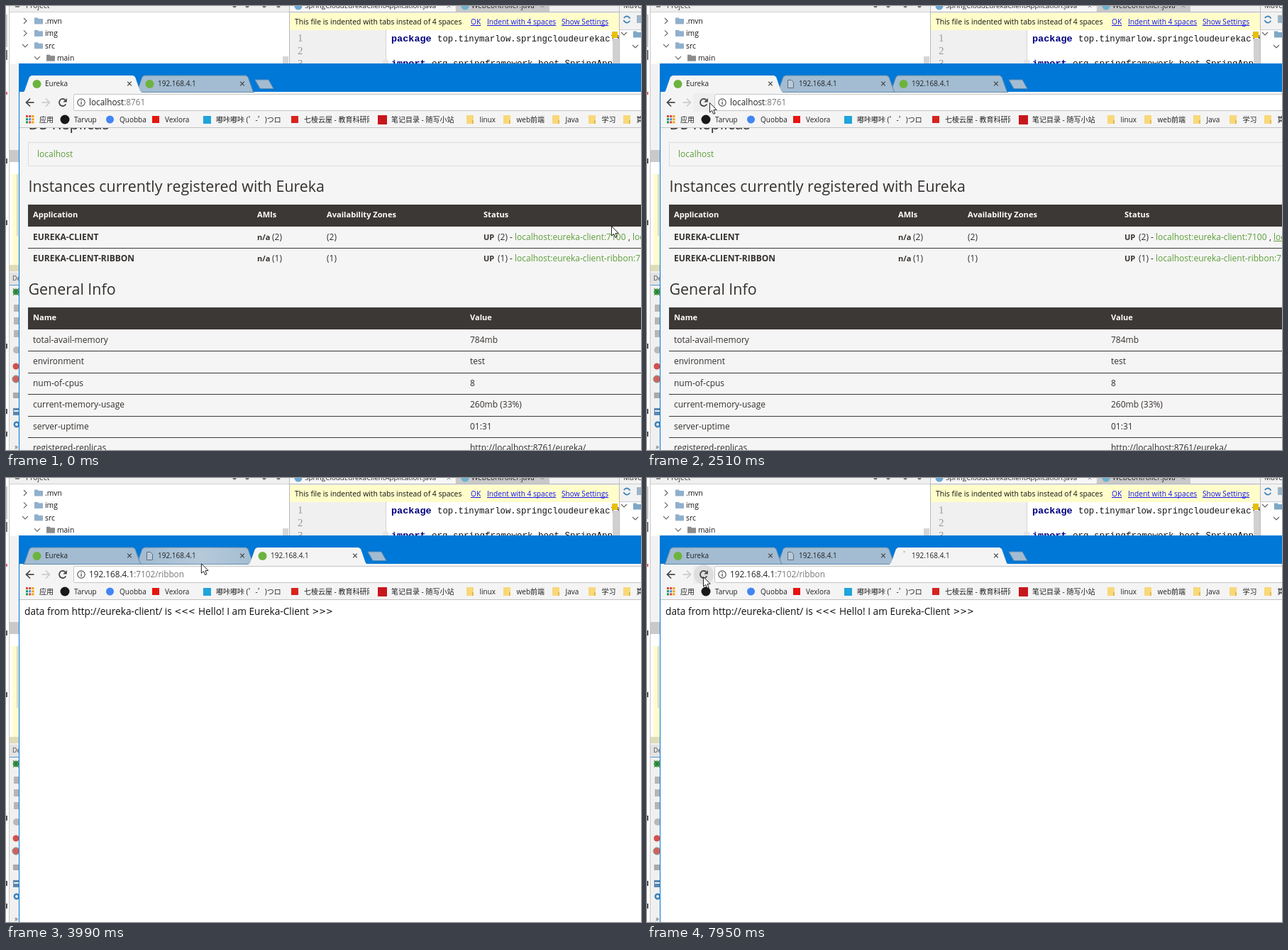
Write an HTML page with a canvas that moves like this. It is 895x626 px and loops after 8 s.

```html
<!DOCTYPE html>
<html lang="en">
<head>
<meta charset="utf-8">
<title>Service registry</title>
<style>
html, body { margin: 0; width: 100%; height: 100%; overflow: hidden; background: #fff; }
canvas { display: block; }
</style>
</head>
<body>
<canvas id="stage" width="895" height="626"></canvas>
<script>
const c = document.getElementById('stage').getContext('2d');
const SANS = '"Open Sans","Noto Sans CJK SC","Noto Sans CJK",sans-serif';
const WIDE = '"DejaVu Sans",sans-serif';
const MONO = '"Liberation Mono",monospace';
const LOOP = 8000, PITCH = 159, GREEN = '#5f9e3c', DARK = '#3c3836', PAGE = '#f5f5f5';
const TAB = '#a3bcd1', TAB_EDGE = '#5f8bb0';

// Screen updates arrive in bursts: start, end, number of steps.
const bursts = [[150, 300, 2], [700, 1660, 8], [1810, 2780, 8], [3020, 3990, 8], [4110, 5070, 8],
  [5190, 5730, 5], [6010, 6280, 3], [6560, 6860, 3], [7290, 7410, 2], [7800, 7950, 2]];
// Pointer path: time, x, y.
const path = [[0, 853, 310], [150, 864, 320], [300, 889, 322], [840, 885, 320], [1250, 440, 180],
  [1520, 150, 114], [1660, 119, 109], [1950, 119, 109], [2500, 88, 136], [2780, 79, 139],
  [3020, 84, 137], [3430, 385, 106], [3690, 387, 106], [4110, 230, 126], [4530, 79, 139]];
const presses = [[2640, 2780], [5190, 5450], [6010, 6270], [6700, 6850], [7290, 7400], [7800, 8000]];
const reloads = [[5320, 5590], [6140, 6270], [6700, 6850], [7290, 7400], [7940, 8000]];

const clamp = v => Math.max(0, Math.min(1, v));
const within = (t, list) => list.find(([a, b]) => t >= a && t < b);

function snap(t) {
  let last = 0;
  for (const [a, b, n] of bursts)
    for (let k = 0; k < n; k++) {
      const step = a + k * (b - a) / (n - 1);
      if (step <= t + .5) last = step;
    }
  return last;
}
function pointerAt(t) {
  const i = path.findIndex(p => p[0] > t);
  if (i < 0) return path[path.length - 1].slice(1);
  const [t0, x0, y0] = path[i - 1], [t1, x1, y1] = path[i], f = (t - t0) / (t1 - t0);
  return [x0 + (x1 - x0) * f, y0 + (y1 - y0) * f];
}

function rect(x, y, w, h, color) { c.fillStyle = color; c.fillRect(x, y, w, h); }
function text(s, x, y, size = 10, color = '#222', weight = 'normal', family = SANS) {
  c.font = `${weight} ${size}px ${family}`;
  c.fillStyle = color;
  c.fillText(s, x, y);
}
function line(points, color, width = 1) {
  c.beginPath();
  points.forEach(([x, y]) => c.lineTo(x, y));
  c.strokeStyle = color; c.lineWidth = width; c.stroke();
}
function poly(points, fill, stroke) {
  c.beginPath();
  points.forEach(([x, y]) => c.lineTo(x, y));
  c.closePath();
  c.fillStyle = fill; c.fill();
  if (stroke) { c.strokeStyle = stroke; c.lineWidth = 1; c.stroke(); }
}
function disc(x, y, r, color) { c.beginPath(); c.arc(x, y, r, 0, 7); c.fillStyle = color; c.fill(); }
function arc(x, y, r, from, to, color, width) {
  c.beginPath(); c.arc(x, y, r, from, to);
  c.strokeStyle = color; c.lineWidth = width; c.stroke();
}
function cross(x, y, r, color, width) {
  line([[x - r, y - r], [x + r, y + r]], color, width);
  line([[x + r, y - r], [x - r, y + r]], color, width);
}
function chevron(x, y, open) {
  line(open ? [[x - 4, y - 2], [x, y + 2], [x + 4, y - 2]] : [[x - 2, y - 4], [x + 2, y], [x - 2, y + 4]], '#666', 1.2);
}
function folder(x, y, color, w = 12, h = 9) {
  rect(x, y - h / 2, w * .45, 3, color);
  rect(x, y - h / 2 + 1.5, w, h - 1.5, color);
}

function editor() {
  rect(0, 0, 895, 626, '#f0f0f0');
  rect(0, 0, 4, 626, '#fff');
  rect(4, 0, 1, 626, '#c4c4c4');
  rect(0, 62, 2, 14, '#777');
  rect(0, 121, 2, 4, '#e06060');
  rect(0, 12, 2, 46, '#c8c8c8');
  for (const y of [215, 302, 476, 568, 600]) rect(0, y, 2, 7, '#555');
  rect(5, 8, 394, 74, '#fff');
  rect(5, 8, 394, 1, '#d0d0d0');
  rect(13, 0, 6, 2, '#888');
  text('Project', 28, 3, 10.3, '#333');
  for (const x of [322, 340, 364, 384]) disc(x, 0, 2.5, '#777');
  [['.mvn', 0, 0], ['img', 0, 0], ['src', 0, 1], ['main', 1, 1]].forEach(([name, depth, open], i) => {
    const x = 27 + depth * 17, y = 21 + i * 17.4;
    chevron(x, y, open);
    folder(x + 13, y, depth ? '#8c8c8c' : '#8fb0cc');
    text(name, x + 28, y + 4, 10.3, '#111');
  });
  rect(390, 71, 8, 11, '#d6d6d6');

  rect(5, 82, 13, 121, '#f2f2f2');
  rect(5, 203, 13, 17, '#c9c9c9');
  rect(5, 220, 13, 145, '#fff');
  rect(9, 237, 9, 128, '#fffbcf');
  rect(15, 237, 2, 87, '#d2d8cc');
  rect(5, 365, 13, 9, '#dedbb8');
  rect(5, 376, 13, 16, '#e2e2e2');
  text('De', 9, 387, 9, '#444');
  rect(5, 393, 13, 1, '#4a8fc7');
  disc(14, 403, 4.5, '#3f9a45');
  line([[10, 398], [18, 408]], '#27682d');
  line([[10, 408], [18, 398]], '#27682d');
  for (const y of [426, 444, 462]) rect(11, y - 5, 7, 10, '#b5b5b5');
  disc(15, 485, 5, '#b8b8b8');
  disc(14, 508, 4.5, '#d2504a');
  disc(14, 526, 4.5, '#cf6159');
  arc(14, 526, 5, 0, 7, '#777', 1);
  rect(10, 545, 8, 8, '#aaa');
  rect(10, 567, 8, 10, '#5b87ad');
  rect(11, 570, 7, 2, '#eee');
  arc(15, 590, 3.2, 0, 7, '#3e82b8', 2.5);
  text('»', 12, 625, 10, '#555');

  rect(399, 0, 1, 82, '#b8b8b8');
  rect(400, 0, 233, 8, '#f7f7f7');
  rect(634, 0, 132, 8, '#c9c9c9');
  rect(400, 8, 464, 1, '#b8b8b8');
  disc(412, 0, 5.5, '#6ca6d2');
  disc(647, 0, 5.5, '#6ab3cf');
  text('SpringCloudEurekaClientApplication.java', 421, 3, 9.8, '#222');
  text('WebController.java', 656, 3, 10, '#222');
  cross(624, 0, 2.5, '#888');
  cross(756, 0, 2.5, '#888');
  rect(400, 10, 464, 24, '#fffdc9');
  text('This file is indented with tabs instead of 4 spaces', 407, 26, 10.4, '#111');
  [['OK', 655], ['Indent with 4 spaces', 678], ['Show Settings', 783]].forEach(([s, x]) => {
    text(s, x, 26, 10.2, '#1414f0');
    rect(x, 27, c.measureText(s).width, 1, '#1414f0');
  });
  rect(536, 34, 328, 48, '#fff');
  rect(535, 34, 1, 48, '#d4d4d4');
  [50, 68, 86].forEach((y, i) => text(i + 1, 411, y, 15, '#999', 'normal', '"Liberation Serif",serif'));
  text('package', 543, 50, 13.5, '#000080', 'bold', MONO);
  text('top.tinymarlow.springcloudeurekaclient', 608, 50, 12.3, '#111', 'normal', MONO);
  text('import', 543, 85, 13.5, '#000080', 'bold', MONO);
  text('org.springframework.boot.SpringApplication', 600, 85, 12.5, '#111', 'normal', MONO);
  rect(531, 76, 8, 8, '#e4e4e4');
  rect(855, 46, 9, 36, '#d0d0d0');
  rect(854, 36, 8, 9, '#e8c000');

  rect(864, 0, 31, 82, '#f2f2f2');
  rect(864, 0, 1, 82, '#bdbdbd');
  text('Maven', 870, 3, 10.3, '#333');
  rect(865, 8, 30, 1, '#ccc');
  arc(875, 19, 4.5, .4, 2.9, '#3b82b5', 1.8);
  arc(875, 19, 4.5, 3.6, 6, '#3b82b5', 1.8);
  rect(889, 13, 6, 11, '#9db5c8');
  rect(865, 33, 30, 49, '#fff');
  rect(865, 33, 30, 1, '#ccc');
  chevron(871, 39, true);
  chevron(887, 57, true);
  folder(884, 40, '#7fa8c6');
}

function tab(x, { title, icon }, active, mouse, now) {
  const shape = [[x, 121.5], [x + 2, 120], [x + 9, 100], [x + 12, 98], [x + 155, 98],
    [x + 158, 100], [x + 165, 120], [x + 167, 121.5]];
  poly(shape, active ? '#f4f4f4' : TAB, active ? null : TAB_EDGE);
  if (!active && mouse[1] < 121 && mouse[0] > x + 5 && mouse[0] < x + 163) {
    const glow = c.createRadialGradient(mouse[0], 110, 0, mouse[0], 110, 80);
    glow.addColorStop(0, 'rgba(255,255,255,.2)');
    glow.addColorStop(1, 'rgba(255,255,255,0)');
    poly(shape, glow);
  }
  if (active) rect(x, 121, 167, 2, '#f4f4f4');
  if (icon === 'leaf') disc(x + 19.5, 110, 6, '#6db33f');
  if (icon === 'page') poly([[x + 15.5, 104.5], [x + 20.5, 104.5], [x + 23.5, 107.5], [x + 23.5, 115.5], [x + 15.5, 115.5]], '#b9cad9', '#5c7080');
  if (icon === 'wait') arc(x + 19, 109.5, 5.5, .2 + (now - 1660) / 160, 2.8 + (now - 1660) / 160, '#999', 1.3);
  if (icon === 'begin') arc(x + 20, 109.5, 5.5, -1.65, -1.3, '#999', 1.3);
  text(title, x + 31, 113, 10, '#222');
  cross(x + 150, 109.5, 2.8, '#444', 1.2);
}

function tabStrip(now, view, mouse) {
  rect(18, 81, 877, 545, '#0078d7');
  const opened = 1 - (1 - clamp((now - 650) / 240)) ** 2;
  const reload = within(now, reloads);
  const loading = now < 2050;
  const address = '192.168.4.1';
  const tabs = [[24, { title: 'Eureka', icon: 'leaf' }, view === 'eureka']];
  if (now >= 700) tabs.push([183, { title: loading ? '正在加载...' : address, icon: loading ? 'wait' : 'page' }, view === 'blank']);
  tabs.push([183 + PITCH * (now >= 700 ? opened : 0),
    { title: address, icon: !reload ? 'leaf' : now - reload[0] < 100 ? 'begin' : 'wait' }, view === 'ribbon']);
  const end = tabs[tabs.length - 1][0] + 168;
  poly([[end, 104], [end + 19, 104], [end + 26, 116.5], [end + 7, 116.5]], TAB, TAB_EDGE);
  tabs.sort((a, b) => a[2] - b[2] || b[0] - a[0]);
  rect(19, 121, 876, 51, '#f4f4f4');
  for (const [x, info, active] of tabs) tab(x, info, active, mouse, now);
}

function toolbar(now, view, mouse) {
  const blank = view === 'blank', ink = '#444', faint = '#ccc';
  const arrow = (x, dir, color) => {
    line([[x - 5.5 * dir, 136], [x + 5 * dir, 136]], color, 1.7);
    line([[x, 130.5], [x + 5.5 * dir, 136], [x, 141.5]], color, 1.7);
  };
  arrow(34, -1, blank ? faint : ink);
  arrow(56, 1, faint);
  const over = Math.abs(mouse[0] - 80) < 14 && Math.abs(mouse[1] - 136) < 14;
  if (over) rect(65, 123, 29, 26, '#eeeeee');
  if (within(now, presses)) disc(80, 136, 14, '#dedede');
  if (blank) cross(80, 136, 4.5, ink, 1.8);
  else {
    arc(80, 136, 5, .5, 5.4, ink, 1.8);
    poly([[85.8, 130], [85.8, 135.5], [80.3, 135.5]], ink);
  }
  c.beginPath();
  c.roundRect(95.5, 124.5, 820, 23, 2);
  c.fillStyle = '#fff'; c.fill();
  c.strokeStyle = '#c4c4c4'; c.lineWidth = 1; c.stroke();
  arc(106, 136, 5.2, 0, 7, '#555', 1.2);
  rect(105.4, 135, 1.3, 4, '#555');
  rect(105.4, 132.7, 1.3, 1.4, '#555');
  const [host, rest] = { eureka: ['localhost', ':8761'], blank: ['192.168.4.1', ':7101/info'], ribbon: ['192.168.4.1', ':7102/ribbon'] }[view];
  text(host, 117, 140, 11.75, '#222');
  text(rest, 117 + c.measureText(host).width, 140, 11.75, '#777');

  const hues = ['#db4437', '#db4437', '#f4a100', '#0f9d58', '#4285f4', '#f4a100', '#0f9d58', '#db4437', '#f4a100'];
  hues.forEach((hue, i) => rect(28 + i % 3 * 4.2, 154 + Math.floor(i / 3) * 4.2, 3, 3, hue));
  text('应用', 47, 164);
  disc(83, 160, 6.5, '#1b1817');
  text('Tarvup', 96, 164);
  disc(146.5, 160, 5.5, '#4285f4');
  text('Quobba', 160, 164);
  rect(206, 155, 10, 10, '#e6150f');
  text('Vexlora', 224, 164);
  rect(278, 155, 11, 11, '#20a4dc');
  text('嘟咔嘟咔 (゜-゜)つロ', 296, 164);
  rect(402, 155, 10, 10, '#d8231f');
  c.save();
  c.beginPath(); c.rect(420, 150, 92, 20); c.clip();
  text('七棱云屋 - 教育科研网', 420, 164);
  c.restore();
  rect(524, 154, 13, 13, '#c8161d');
  text('笔记目录 - 随写小站', 543, 164);
  [['linux', 649], ['web前端', 701], ['Java', 770], ['学习', 821], ['算法', 870]].forEach(([s, x]) => {
    rect(x, 154, 10, 12, '#f8d878');
    rect(x + 8, 161, 2, 5, '#e0b850');
    text(s, x + 18.5, 164);
  });
  rect(19, 171, 876, 1, '#c2c2c2');
}

function registryPage(now) {
  rect(19, 172, 876, 454, PAGE);
  c.save();
  c.beginPath(); c.rect(19, 172, 876, 454); c.clip();
  const body = (s, x, y, color = '#34302d') => text(s, x, y, 12, color);
  const bold = (s, x, y, size = 12, color = '#34302d') => text(s, x, y, size, color, 'bold');
  const heading = (s, y) => text(s, 31.5, y, 21.4, '#34302d');
  const header = (y, cells) => {
    rect(31, y, 864, 31, DARK);
    cells.forEach(([s, x]) => bold(s, x, y + 18, 11.1, '#fff'));
  };
  heading('DS Replicas', 174);
  c.strokeStyle = '#dcdcdc'; c.lineWidth = 1; c.strokeRect(31.5, 192.5, 880, 33);
  body('localhost', 44, 213, GREEN);
  heading('Instances currently registered with Eureka', 262);
  header(280, [['Application', 38], ['AMIs', 354], ['Availability Zones', 452], ['Status', 673]]);
  [['EUREKA-CLIENT', 2, 'eureka-client:7100'], ['EUREKA-CLIENT-RIBBON', 1, 'eureka-client-ribbon:7102']].forEach(([name, n, link], i) => {
    const y = 329.5 + i * 30.5;
    bold(name, 38, y);
    bold('n/a', 354, y, 11);
    body(`(${n})`, 375, y);
    body(`(${n})`, 452, y);
    bold('UP', 673, y, 11);
    body(`(${n}) -`, 693, y);
    body('localhost:' + link, 717, y, GREEN);
  });
  body(',', 877, 329.5);
  body('localhost:eureka-client:7101', 883, 329.5, GREEN);
  if (now >= 150 && now < 300) rect(717, 331, 157, 1, GREEN);
  if (now >= 300 && now < 2700) rect(883, 331, 12, 1, GREEN);
  rect(31, 341, 864, 1, DARK);
  heading('General Info', 407);
  header(425, [['Name', 38], ['Value', 654]]);
  [['total-avail-memory', '784mb'], ['environment', 'test'], ['num-of-cpus', '8'], ['current-memory-usage', '260mb (33%)'],
    ['server-uptime', '01:31'], ['registered-replicas', 'http://localhost:8761/eureka/']].forEach(([name, value], i) => {
    const y = 474.5 + i * 30.5;
    body(name, 38, y);
    body(value, 654, y);
    rect(31, Math.round(y + 11.5), 864, 1, DARK);
  });
  c.restore();
}

function ribbonPage() {
  rect(19, 172, 876, 454, '#fff');
  text('data from http://eureka-client/ is', 26, 193, 13.7, '#111');
  text('<<<', 237.5, 192, 11.6, '#111', 'normal', WIDE);
  text('Hello! I am Eureka-Client', 271, 193, 13.7, '#111');
  text('>>>', 431.5, 192, 11.6, '#111', 'normal', WIDE);
}

function tooltip(now) {
  c.globalAlpha = now >= 5450 ? 0 : clamp((now - 4800) / 385);
  rect(81, 158, 69, 17, 'rgba(0,0,0,.3)');
  rect(79, 156, 69, 17, '#888');
  rect(80, 157, 67, 15, '#fff');
  text('重新加载此页', 83, 168, 10, '#666');
  c.globalAlpha = 1;
}

function pointer([x, y], hand) {
  c.save();
  c.translate(x + .5, y + .5);
  if (hand) poly([[-1, 0], [1, 0], [1.5, 5], [8, 6.5], [9, 8], [8.5, 12], [7, 16], [0, 16], [-5, 9.5], [-4, 8], [-1.5, 9.5]], '#fff', '#111');
  else poly([[0, 0], [0, 13.5], [3.2, 10.8], [5.3, 15.8], [7.6, 14.8], [5.5, 10], [9.7, 9.7]], '#fff', '#222');
  c.restore();
}

function draw() {
  const now = snap(performance.now() % LOOP);
  const view = now < 700 ? 'eureka' : now < 1805 ? 'blank' : now < 3650 ? 'eureka' : 'ribbon';
  const mouse = pointerAt(now);
  editor();
  tabStrip(now, view, mouse);
  toolbar(now, view, mouse);
  if (view === 'eureka') registryPage(now);
  else if (view === 'ribbon') ribbonPage();
  else rect(19, 172, 876, 454, '#fff');
  tooltip(now);
  pointer(mouse, now >= 150 && now < 800);
  requestAnimationFrame(draw);
}
draw();
</script>
</body>
</html>
```
